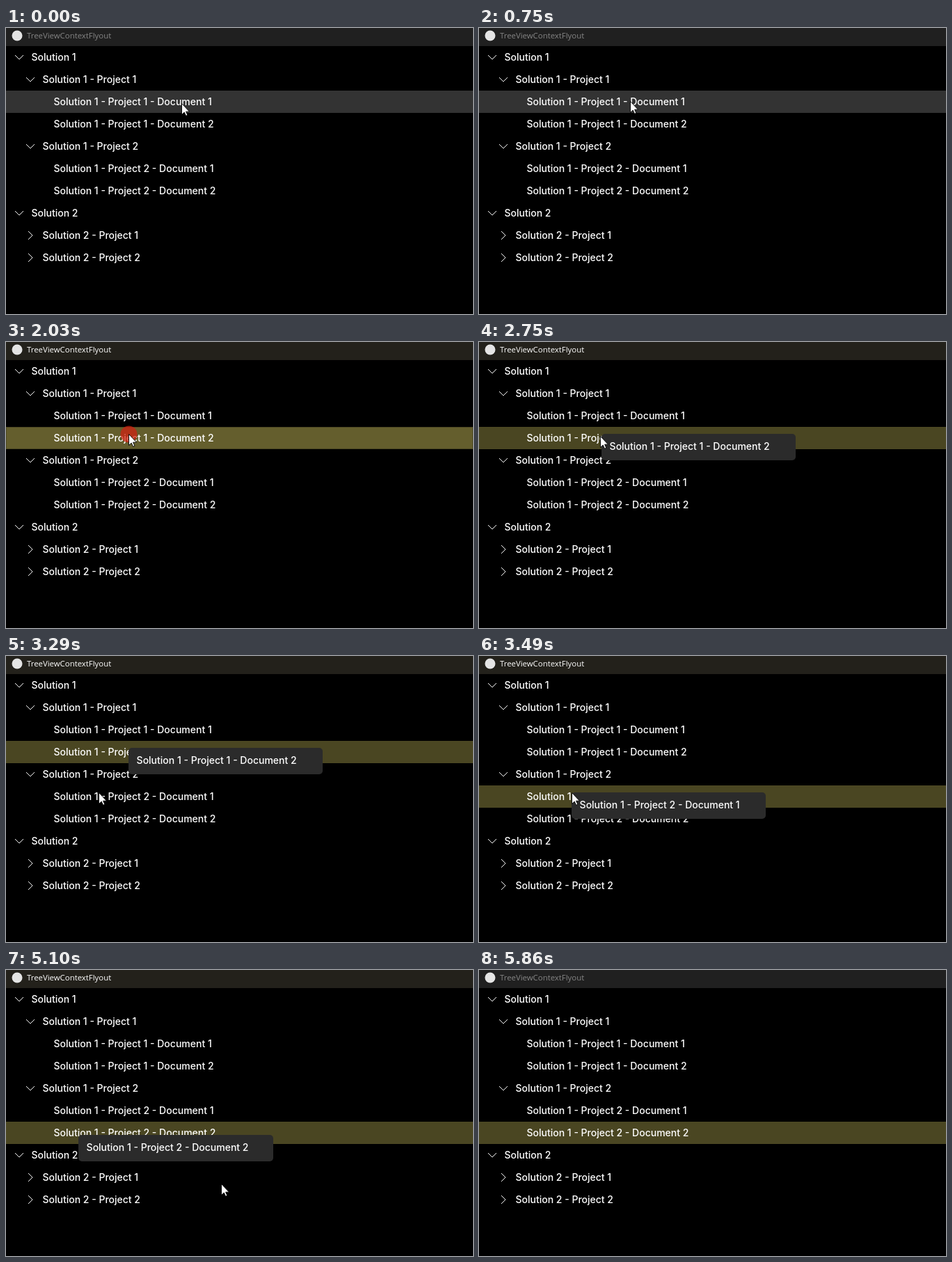
Write an HTML page that moves like this. It is 671 px wide and 411 px high and loops after 5.99 s.

```html
<!DOCTYPE html>
<html lang="en">
<head>
<meta charset="utf-8">
<title>TreeViewContextFlyout</title>
<style>
html, body { margin: 0; width: 100%; height: 100%; overflow: hidden; background: #000; }
svg { display: block; }
text { font: 500 14px Inter, sans-serif; fill: #fff; white-space: pre; }
#title { font: 11.4px "Open Sans", sans-serif; }
.chevron { fill: none; stroke: #f4f4f4; stroke-width: 1; }
</style>
</head>
<body>
<svg width="671" height="411" viewBox="0 0 671 411">
  <rect width="671" height="411" fill="#000"/>
  <rect id="bar" width="671" height="26"/>
  <circle cx="16" cy="11" r="7.5" fill="#e4e4e4"/>
  <text id="title" x="30" y="15">TreeViewContextFlyout</text>
  <rect id="band" x="0.5" width="670" height="31"/>
  <g id="tree"></g>
  <g id="flyout">
    <rect id="panel" height="38" rx="5" fill="#2b2b2b"/>
    <text id="label" x="11.6" y="23"></text>
  </g>
  <circle id="press" r="12" fill="#d41e0f" fill-opacity="0.7"/>
  <path id="cursor" d="M.5 .5V16.6L4.2 13.1L6.6 18.3L8.9 17.3L6.6 12.2H11.5Z" fill="#fff" stroke="#000" stroke-width="0.9"/>
</svg>
<script>
const LOOP = 5990, END = 5860;
const $ = id => document.getElementById(id);

// Tree rows: [depth, text, arrow]
const rows = [
  [0, 'Solution 1', 'down'],
  [1, 'Solution 1 - Project 1', 'down'],
  [2, 'Solution 1 - Project 1 - Document 1'],
  [2, 'Solution 1 - Project 1 - Document 2'],
  [1, 'Solution 1 - Project 2', 'down'],
  [2, 'Solution 1 - Project 2 - Document 1'],
  [2, 'Solution 1 - Project 2 - Document 2'],
  [0, 'Solution 2', 'down'],
  [1, 'Solution 2 - Project 1', 'right'],
  [1, 'Solution 2 - Project 2', 'right']
];
const arrows = { down: 'M-6 -3L0 3L6 -3', right: 'M-3 -6L3 0L-3 6' };

$('tree').innerHTML = rows.map(([depth, text, arrow], i) => {
  const x = 36.5 + depth * 16, y = 42 + i * 32;
  const mark = arrow
    ? `<path class="chevron" transform="translate(${x - 17.5} ${y})" d="${arrows[arrow]}"/>` : '';
  return `${mark}<text x="${x}" y="${y + 5}">${text}</text>`;
}).join('');

// Right clicks: pointer down, row selected, flyout open
const clicks = [
  { down: 820, select: 890, open: 1090, row: 2, x: 217, y: 106, width: 277 },
  { down: 1950, select: 2030, open: 2150, row: 3, x: 176, y: 132, width: 279 },
  { down: 3360, select: 3430, open: 3490, row: 5, x: 133, y: 196, width: 279 },
  { down: 4490, select: 4620, open: 4690, row: 6, x: 104, y: 237, width: 280 }
];

// Pointer moves: start, ms per step, steps, end point
const moves = [
  [70, 70, 2, 212, 94],
  [410, 70, 6, 217, 106],
  [1550, 70, 5, 176, 132],
  [2750, 77, 8, 133, 196],
  [3880, 68, 6, 104, 237],
  [4890, 70, 9, 596, 405],
  [5520, 70, 3, 617, 413]
];

const ease = p => p * p * (3 - 2 * p);
const show = (id, on) => $(id).setAttribute('visibility', on ? 'visible' : 'hidden');
const set = (id, attrs) => {
  for (const key in attrs) $(id).setAttribute(key, attrs[key]);
};

function pointer(t) {
  let x = 252, y = 108;
  for (const [start, step, count, endX, endY] of moves) {
    if (t < start) break;
    const p = ease(Math.min(1, (Math.floor((t - start) / step) + 1) / count));
    x += (endX - x) * p;
    y += (endY - y) * p;
  }
  return [Math.round(x), Math.round(y)];
}

function draw(t) {
  const active = t >= clicks[0].down && t < END;
  set('bar', { fill: active ? '#23211b' : '#202020' });
  set('title', { style: `fill:${active ? '#fff' : '#858585'}` });

  const click = clicks.filter(c => t >= c.down).pop();
  const open = !!click && t >= click.open && t < END;
  const pressed = !!click && t < click.open;
  const selected = !!click && t >= click.select;
  const [fill, stroke] = !selected ? ['#333333', '#333333']
    : [pressed ? '#645e2d' : '#4a4622', '#4c4823'];
  set('band', { y: 26.5 + (click ? click.row : 2) * 32, fill, stroke });

  show('flyout', open);
  show('press', pressed);
  if (click) {
    set('flyout', { transform: `translate(${click.x} ${click.y})` });
    set('panel', { width: click.width });
    set('press', { cx: click.x + 0.5, cy: click.y + 0.5 });
    $('label').textContent = rows[click.row][1];
  }

  const [x, y] = pointer(t);
  set('cursor', { transform: `translate(${x} ${y})` });
  show('cursor', t < 5660);
}

const begin = performance.now();
function tick() {
  draw((performance.now() - begin) % LOOP);
  requestAnimationFrame(tick);
}
tick();
</script>
</body>
</html>
```
